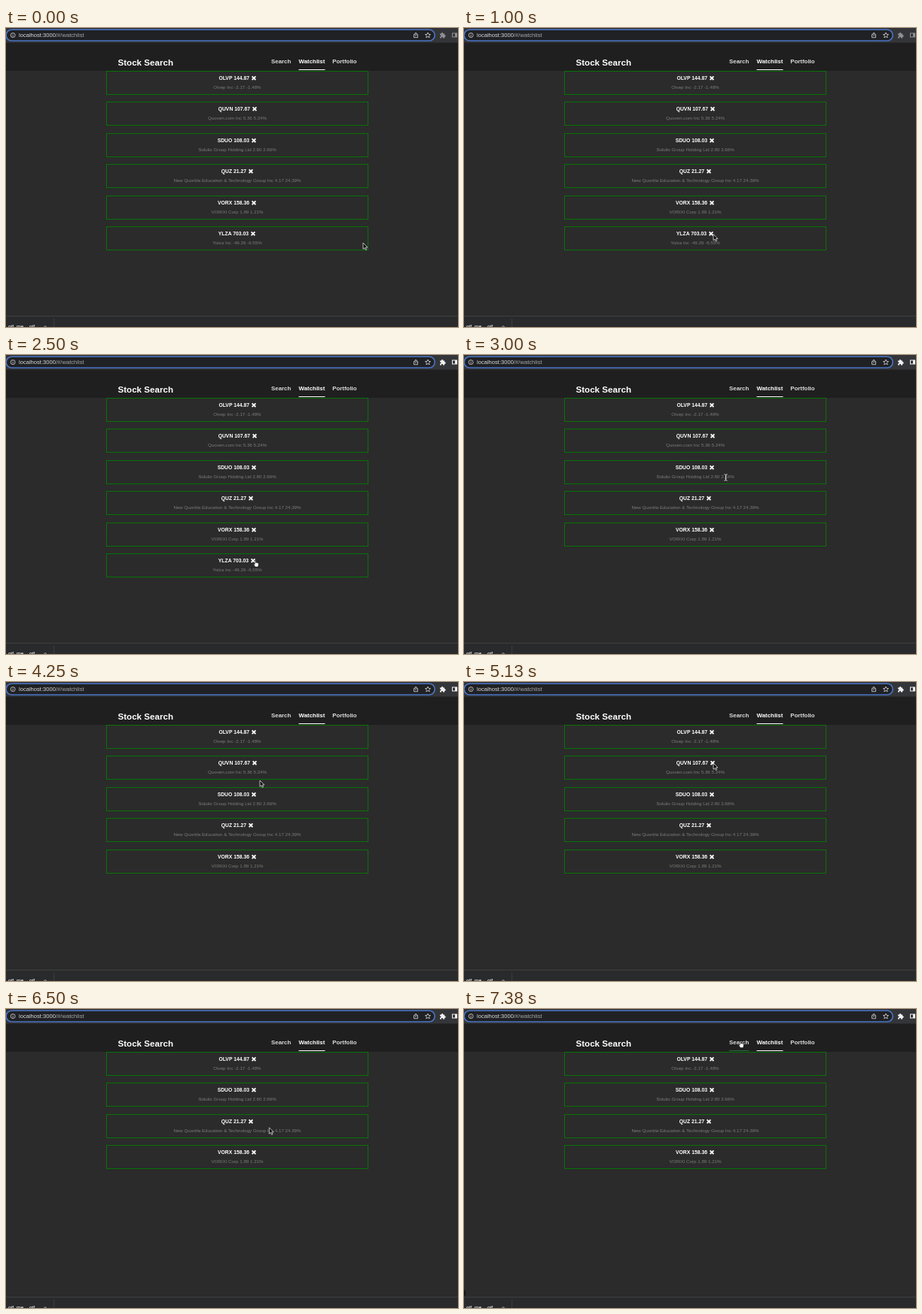
Recreate the animation shown at these times as an HTML page. Size 600 px wide and 398 px high, loop 8000 ms.

```html
<!DOCTYPE html>
<html lang="en">
<head>
<meta charset="utf-8">
<title>Watchlist</title>
<style>
  html, body { margin: 0; height: 100%; overflow: hidden; background: #2b2b2b; }
  svg { display: block; width: 100%; height: 100%; }
  text { font-family: "Liberation Sans", Arial, sans-serif; fill: #fff; }
  .nav { font-weight: bold; font-size: 7.9px; }
  .name { font-weight: bold; font-size: 6.8px; text-anchor: end; }
  .info { font-size: 6.2px; fill: #7c7c7c; text-anchor: middle; }
  .line { fill: none; stroke: #c4c6c9; stroke-width: .9; }
</style>
</head>
<body>
<svg viewBox="0 0 600 398">
  <!-- browser bar -->
  <rect width="600" height="20" fill="#343538"/>
  <rect x=".2" y="2.2" width="569" height="14.8" rx="7.4" fill="#202124" stroke="#4874c4" stroke-width="1.6"/>
  <g class="line">
    <circle cx="9.2" cy="9.6" r="3"/>
    <path d="M9.2 9.2v2.2M9.2 7.6v.8"/>
    <path d="M542.8 8.5h-1.3v4.2h5v-4.2h-1.3M544 11V6.3M542.4 7.8L544 6.2l1.6 1.6"/>
    <path d="M560 6l1 2.4 2.5.2-1.9 1.7.6 2.5-2.2-1.3-2.2 1.3.6-2.5-1.9-1.7 2.5-.2z"/>
  </g>
  <text x="17" y="12.1" font-size="7.6" style="fill:#d8dadd">localhost:3000<tspan fill="#a4a7ab">/#/watchlist</tspan></text>
  <g id="tools">
    <path d="M576 7.6h1.9a1.2 1.2 0 1 1 2.3 0h1.9v1.8a1.2 1.2 0 1 1 0 2.3v1.8h-2.1a1.1 1.1 0 1 0-2.1 0H576v-2a1.1 1.1 0 1 0 0-2.1z"/>
    <path fill-rule="evenodd" d="M592 6.4h7v6.2h-7zm1 1v4.2h3V7.4z"/>
  </g>

  <!-- page header -->
  <rect y="19.5" width="600" height="37.5" fill="#1f1f1f"/>
  <text x="148.5" y="49.5" font-size="11.6" font-weight="bold">Stock Search</text>
  <g class="nav">
    <text x="352" y="47.3" style="fill:#dcdcdc">Search</text>
    <text x="388.5" y="47.3">Watchlist</text>
    <text x="433.2" y="47.3" style="fill:#dcdcdc">Portfolio</text>
  </g>
  <rect x="388.5" y="55" width="35" height="1" fill="#fff"/>
  <rect id="hover" x="352" y="55" width="26.5" height="1" fill="#2f6b3c"/>

  <g id="cards"></g>

  <!-- download shelf -->
  <path id="bubble" d="M0 373.5q2.2 1 2.2 4.8t-2.2 4.6z" fill="#141414"/>
  <rect y="383" width="600" height="15" fill="#292a2c"/>
  <path d="M0 383.5H600M63.7 387v11" stroke="#414246" stroke-width=".9"/>
  <text x="3" y="399.6" font-size="6.8">gif_me....gif</text>
  <path class="line" d="M50.2 398.3l1.9-1.9 1.9 1.9"/>

  <g id="cursor" stroke-linejoin="round">
    <path id="arrow" d="M0 0v8.2l1.9-1.7 1.3 2.9 1.4-.6-1.3-2.8h2.6z" fill="#0c0c0c" stroke="#eee" stroke-width=".75"/>
    <path id="hand" d="M-.8-.7q.8-.9 1.5 0V2q.7-.5 1.2.1.8-.4 1.2.2 1-.2 1.1.8v2Q4 6.4 3.5 7.6H-.3Q-1 5.8-2.4 4.3q0-1.2 1.6-.2z" fill="#fff" stroke="#111" stroke-width=".6"/>
    <path id="beam" d="M-2-4.2q2 0 2 1.2 0-1.2 2-1.2M0-3v6M-2 4.2q2 0 2-1.2 0 1.2 2 1.2M-1 1.2h2" fill="none" stroke="#ddd" stroke-width=".9"/>
  </g>
</svg>
<script>
const $ = id => document.getElementById(id);
const LOOP = 8000, STEP = 125;

// title, centre of its cross, details, time of removal
const stocks = [
  ["OLVP 144.87", 329, "Olvep Inc -2.17 -1.48%"],
  ["QUVN 107.67", 330, "Quoven.com Inc 5.36 5.24%", 5500],
  ["SDUO 108.03", 329, "Sidulio Group Holding Ltd 2.80 2.66%"],
  ["QUZ 21.27", 325, "New Quortila Education &amp; Technology Group Inc 4.17 24.39%"],
  ["VORX 158.36", 329, "VORIXI Corp 1.89 1.21%"],
  ["YLZA 703.03", 328, "Yolza Inc -49.26 -6.55%", 2625]
];

$("cards").innerHTML = stocks.map(([title, x, info]) => `<g>
  <rect x="133.5" y=".5" width="347" height="31" fill="none" stroke="#077207"/>
  <text class="name" x="${x - 6}" y="12.2">${title}</text>
  <path d="M${x - 2.4} 7.3l4.8 4.8m0-4.8l-4.8 4.8" stroke="#fff" stroke-width="1.8"/>
  <text class="info" x="307" y="24.1">${info}</text></g>`).join("");
const cards = [...$("cards").children];

// cursor path: time, x, y
const path = [
  [0, 474, 286], [875, 331, 274.5], [2625, 331, 274.5], [3000, 347.5, 163],
  [3250, 343, 147], [4250, 337, 131], [5125, 331, 108], [5750, 331, 108],
  [6250, 345, 186], [7125, 367, 44], [LOOP, 367, 44]
];
// cursor shape from each time on
const shapes = [
  [0, "arrow"], [1125, "hand"], [2750, "arrow"], [3000, "beam"],
  [3125, "arrow"], [5250, "hand"], [5875, "arrow"], [7000, "hand"]
];

function cursorAt(t) {
  const i = path.findIndex(p => p[0] > t);
  const [t0, x0, y0] = path[i - 1], [t1, x1, y1] = path[i];
  const u = (t - t0) / (t1 - t0), k = u * u * (3 - 2 * u);
  return [x0 + (x1 - x0) * k, y0 + (y1 - y0) * k];
}

const show = (el, on) => { el.style.display = on ? "" : "none"; };

function render(now) {
  const t = Math.floor(now % LOOP / STEP) * STEP;
  let row = 0;
  cards.forEach((card, i) => {
    const alive = t < (stocks[i][3] ?? Infinity);
    show(card, alive);
    if (alive) card.setAttribute("transform", `translate(0 ${57 + Math.round(41.4 * row++)})`);
  });

  $("cursor").setAttribute("transform", `translate(${cursorAt(t)})`);
  const shape = shapes.filter(s => s[0] <= t).pop()[1];
  for (const id of ["arrow", "hand", "beam"]) show($(id), id === shape);

  $("tools").setAttribute("fill", t < 1500 ? "#8f9194" : "#f1f1f1");
  show($("hover"), t >= 7000);
  show($("bubble"), t >= 7375);
}

const start = performance.now();
function tick() {
  render(performance.now() - start);
  requestAnimationFrame(tick);
}
tick();
</script>
</body>
</html>
```
